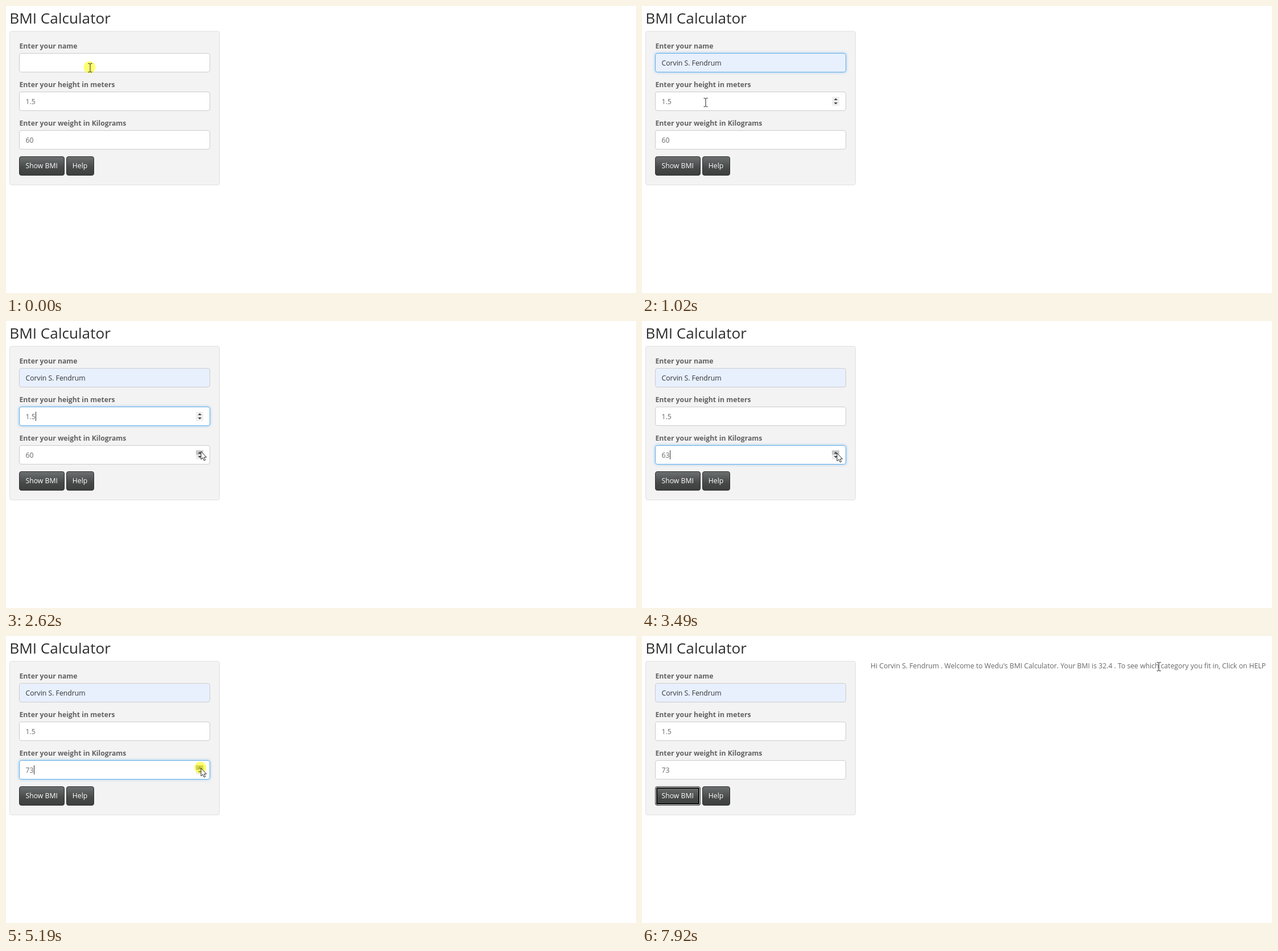
Write an HTML page that moves like this. It is 1108x506 px and loops after 7.99 s.

```html
<!DOCTYPE html>
<html lang="en">
<head>
<meta charset="utf-8">
<title>BMI Calculator</title>
<style>
html, body { margin: 0; width: 100%; height: 100%; overflow: hidden; background: #fff; }
svg { display: block; width: 1108px; height: 506px; }
text { font: 12.23px "Open Sans", sans-serif; fill: #666; }
.title { font-size: 26.16px; fill: #2d2d2d; }
.label { font-weight: 700; fill: #626262; }
.button { fill: #fff; }
.item { font-size: 10.7px; font-weight: 600; fill: #f4f4f4; }
.preview { font: 11.7px "Liberation Sans", Arial, sans-serif; fill: #111; }
.field { fill: #fff; stroke: #ccc; }
.focus { stroke: #66afe9; filter: drop-shadow(0 0 2.5px rgba(102, 175, 233, .65)); }
</style>
</head>
<body>
<svg id="stage" viewBox="0 0 1108 506">
  <defs>
    <linearGradient id="dark" x2="0" y2="1">
      <stop stop-color="#6d7070"/><stop offset=".6" stop-color="#474949"/><stop offset="1" stop-color="#3d3f3f"/>
    </linearGradient>
    <linearGradient id="darker" x2="0" y2="1">
      <stop stop-color="#606363"/><stop offset=".6" stop-color="#3d3f3f"/><stop offset="1" stop-color="#333535"/>
    </linearGradient>
  </defs>
  <text class="title" x="6.2" y="31">BMI Calculator</text>
  <rect x="6.5" y="44.5" width="369" height="271" rx="3.5" fill="#f3f3f3" stroke="#e1e1e1"/>
  <g id="form"></g>
  <rect id="showButton" x="23.5" y="265.5" width="79" height="33" rx="3.5" fill="url(#dark)" stroke="#2e2f2f"/>
  <g id="ring" fill="none">
    <rect x="24.5" y="266.5" width="77" height="31" rx="3" stroke="#fff"/>
    <rect x="26" y="268" width="74" height="28" rx="2" stroke="#0c0c0c" stroke-width="2"/>
  </g>
  <text class="button" x="34.5" y="286">Show BMI</text>
  <rect x="106.5" y="265.5" width="48" height="33" rx="3.5" fill="url(#dark)" stroke="#2e2f2f"/>
  <text class="button" x="116.8" y="286">Help</text>
  <text id="result" x="401.9" y="57">Hi Corvin S. Fendrum . Welcome to Wedu's BMI Calculator. Your BMI is 32.4 . To see which category you fit in, Click on HELP</text>
  <g id="menu">
    <path d="M23 117.5H360V317Q360 320 357 320H26Q23 320 23 317Z" fill="#292a2d" style="filter:drop-shadow(0 1px 1px rgba(0,0,0,.3))"/>
    <rect id="hover" x="23" y="219" width="337" height="31" fill="#4a4a4d"/>
  </g>
  <circle id="halo" r="10.5" fill="#ff0" fill-opacity=".55"/>
  <g id="pointer">
    <path id="arrow" d="M0 0V14L3.2 11L5.3 16L7.6 15L5.5 10.2H9.6Z" fill="#fff" stroke="#111" stroke-width=".9"/>
    <path id="beam" d="M-3.5 -7.5H-1.2L0 -6.5L1.2 -7.5H3.5M0 -6.5V6.5M-3.5 7.5H-1.2L0 6.5L1.2 7.5H3.5" fill="none" stroke="#222"/>
    <path id="hand" d="M-1.5 10V.8Q-1.5 -.8 0 -.8T1.5 .8V6.2Q3 5.2 4.3 6.5Q5.8 5.8 6.8 7Q8.5 6.5 8.5 8.5V12Q8.5 14 7 16V17.5H-.5V16Q-2.5 13.5 -4.8 10.5Q-5 8.5 -3 8.7Z" fill="#fff" stroke="#111" stroke-width=".8"/>
  </g>
</svg>
<script>
const LOOP = 7990;
const $ = id => document.getElementById(id);
const show = (el, on) => { el.style.display = on ? '' : 'none'; };

function add(parent, tag, attrs, text = '') {
  const el = document.createElementNS('http://www.w3.org/2000/svg', tag);
  for (const key in attrs) el.setAttribute(key, attrs[key]);
  el.textContent = text;
  parent.append(el);
  return el;
}

// Form rows; mid is the vertical centre of the input
function makeField(label, mid, value) {
  const form = $('form');
  add(form, 'text', { class: 'label', x: 23.5, y: mid - 25 }, label);
  const box = add(form, 'rect', { class: 'field', x: 23.5, y: mid - 16.5, width: 335, height: 33, rx: 3.5 });
  const text = add(form, 'text', { x: 34.5, y: mid + 5 }, value);
  const caret = add(form, 'rect', { y: mid - 8, width: 1, height: 16, fill: '#333' });
  const spin = add(form, 'g', {});
  const half = y => add(spin, 'rect', { x: 334, y, width: 13, height: 8, fill: '#efefef' });
  const up = half(mid - 8), down = half(mid);
  for (const s of [-1, 1])
    add(spin, 'path', { d: `M337.5 ${mid + 2 * s}H344L340.75 ${mid + 5.5 * s}Z`, fill: '#444' });
  return { mid, box, text, caret, spin, up, down };
}

const nameField = makeField('Enter your name', 100, '');
const heightField = makeField('Enter your height in meters', 168, '1.5');
const weightField = makeField('Enter your weight in Kilograms', 236, '60');

const person = 'Corvin S. Fendrum';
['BD', 'Md. Lorabeem Dravlon Wedu', 'TELB DeX4', person, 'Wedu Departs', 'Md. Lorabeem Dravlon']
  .forEach((item, i) => add($('menu'), 'text', { class: 'item', x: 34, y: 144.5 + i * 31.4 }, item));

// Pointer stops: time, x, y, shape
const stops = [
  [0, 148, 109, 'beam'], [490, 136, 228, 'arrow'], [640, 136, 232, 'beam'],
  [1020, 112, 170, 'beam'], [1100, 225, 170, 'beam'], [1180, 340, 170, 'beam'],
  [1640, 341, 165, 'arrow'], [1790, 341, 171, 'arrow'], [2090, 661, 188, 'arrow'],
  [2470, 560, 205, 'arrow'], [2540, 430, 222, 'arrow'], [2620, 343, 230, 'arrow'],
  [2790, 343, 233, 'arrow']
];
for (let i = 1; i <= 7; i++) {
  const p = i / 7, y = 233 + 42 * p;
  stops.push([5343 + i * 76.7, 343 - 267 * p, y, i === 7 ? 'hand' : y < 252 ? 'beam' : 'arrow']);
}
stops.push([7380, 150, 245, 'arrow'], [7450, 400, 150, 'arrow'], [7530, 660, 70, 'arrow'],
  [7610, 813, 31, 'arrow'], [7840, 862, 42, 'arrow'], [7920, 909, 54, 'beam']);

const presses = [
  [0, 150], [560, 640], [1640, 1720], [1870, 1940], [2790, 2940], [3110, 3260],
  [3410, 3490], [3570, 3650], [3730, 3810], [3890, 3970], [4050, 4130],
  [4260, 4490], [4570, 4810], [5190, 5270], [6200, 6430]
];
const increments = [2790, 3110, 3410, 3570, 3730, 3890, 4050, 4260, 4340, 4410, 4570, 4640, 5190];

function drawField(field, focused, caretX, caretOn, pointer, pressed) {
  const [, x, y] = pointer;
  const inside = x > 23 && x < 359 && Math.abs(y - field.mid) < 17;
  field.box.setAttribute('class', focused ? 'field focus' : 'field');
  show(field.caret, focused && caretOn);
  field.caret.setAttribute('x', caretX);
  show(field.spin, field !== nameField && (focused || inside));
  const over = inside && x > 333 && x < 347 && Math.abs(y - field.mid) < 9;
  const shade = on => over && on ? (pressed ? '#a0a0a0' : '#c8c8c8') : '#efefef';
  field.up.setAttribute('fill', shade(y < field.mid));
  field.down.setAttribute('fill', shade(y >= field.mid));
}

function draw(t) {
  const within = (a, b) => t >= a && t < b;
  const pointer = stops.filter(s => s[0] <= t).pop();
  const [, x, y, shape] = pointer;
  const pressed = presses.some(p => within(...p));

  drawField(nameField, within(70, 1640), within(640, 1640) ? 140 : 35, t < 1020, pointer, pressed);
  drawField(heightField, within(1640, 2790), 52, !within(2090, 2470), pointer, pressed);
  drawField(weightField, within(2790, 6200), 49, !within(5650, 6200), pointer, pressed);

  nameField.box.style.fill = t >= 490 ? '#e8f0fe' : '';
  nameField.text.textContent = t >= 490 ? person : '';
  nameField.text.setAttribute('class', within(490, 640) ? 'preview' : '');
  nameField.text.style.fill = t >= 640 ? '#333' : '';
  weightField.text.textContent = 60 + increments.filter(c => c <= t).length;

  show($('menu'), within(150, 640));
  show($('hover'), t >= 490);
  $('showButton').setAttribute('fill', shape === 'hand' ? 'url(#darker)' : 'url(#dark)');
  show($('ring'), t >= 6200);
  show($('result'), t >= 6900);

  show($('halo'), pressed);
  $('halo').setAttribute('transform', `translate(${x - 1} ${y - 1})`);
  $('pointer').setAttribute('transform', `translate(${x} ${y})`);
  for (const id of ['arrow', 'beam', 'hand']) show($(id), id === shape);
}

const start = performance.now();
function tick() {
  draw((performance.now() - start) % LOOP);
  requestAnimationFrame(tick);
}
tick();
</script>
</body>
</html>
```
